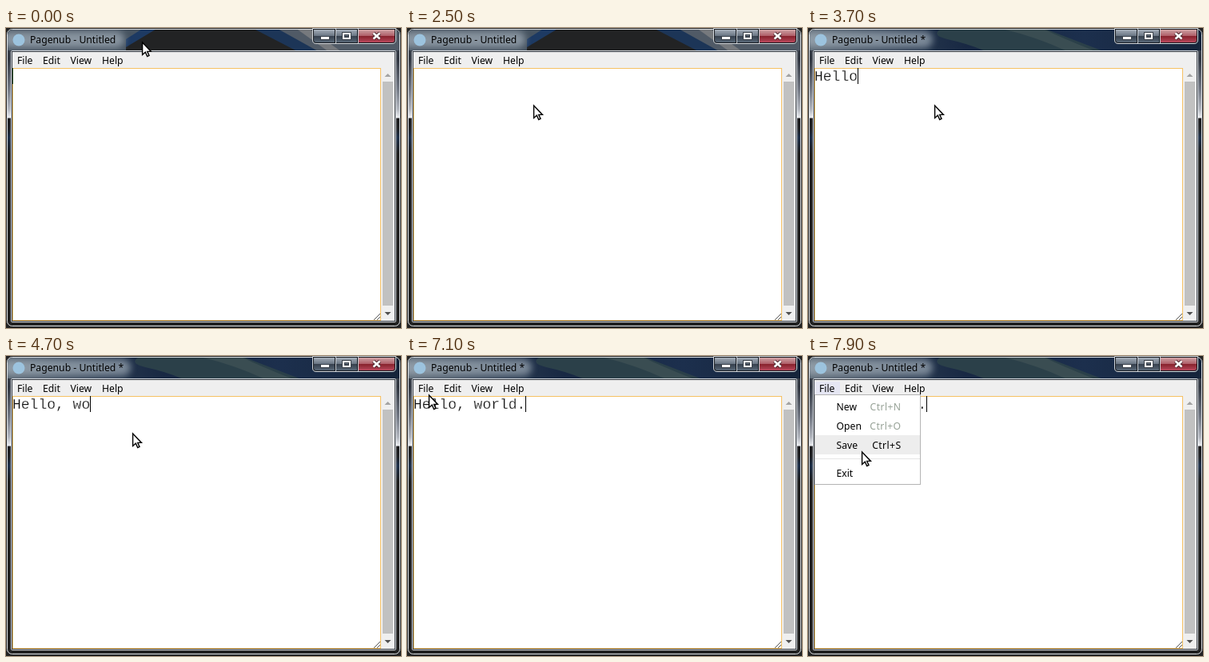
Animation of 494x375 px, one loop 8 s. Source, as an HTML page:

```html
<!DOCTYPE html>
<html lang="en">
<head>
<meta charset="utf-8">
<title>Text editor</title>
<style>
  html, body { margin: 0; width: 100%; height: 100%; overflow: hidden; background: #222; }
  svg { display: block; }
  text { font: 12.2px "Noto Sans", "Open Sans", sans-serif; fill: #000; white-space: pre; }
  #typed { font: 18px "Liberation Mono", monospace; fill: #111; stroke: #fff; stroke-width: .3; }
  .key { fill: #97a297; letter-spacing: .4px; text-anchor: end; }
  .hot { fill: #000; }
</style>
</head>
<body>
<svg width="494" height="375" viewBox="0 0 494 375">
  <defs>
    <linearGradient id="side" x2="0" y2="1">
      <stop offset="0" stop-color="#4a525c"/>
      <stop offset=".1" stop-color="#343a44"/>
      <stop offset=".2" stop-color="#747a86"/>
      <stop offset=".27" stop-color="#b4b8c0"/>
      <stop offset=".297" stop-color="#eceef2"/>
      <stop offset=".302" stop-color="#1e1e20"/>
      <stop offset=".335" stop-color="#242629"/>
      <stop offset=".365" stop-color="#22344e"/>
      <stop offset=".42" stop-color="#222"/>
      <stop offset="1" stop-color="#222"/>
    </linearGradient>
    <linearGradient id="grey" x2="0" y2="1">
      <stop offset="0" stop-color="#a5aeb9"/>
      <stop offset=".47" stop-color="#6b7785"/>
      <stop offset=".5" stop-color="#343e4b"/>
      <stop offset="1" stop-color="#596878"/>
    </linearGradient>
    <linearGradient id="red" x2="0" y2="1">
      <stop offset="0" stop-color="#cfa3a5"/>
      <stop offset=".47" stop-color="#b0606a"/>
      <stop offset=".5" stop-color="#85202a"/>
      <stop offset="1" stop-color="#b8485c"/>
    </linearGradient>
    <linearGradient id="navy">
      <stop offset="0" stop-color="#596672"/>
      <stop offset=".3" stop-color="#22334a"/>
      <stop offset=".4" stop-color="#182843"/>
      <stop offset=".7" stop-color="#1c2f4d"/>
      <stop offset="1" stop-color="#15243a"/>
    </linearGradient>
    <filter id="blur" x="-20%" y="-80%" width="140%" height="260%"><feGaussianBlur stdDeviation="4"/></filter>
    <clipPath id="bar"><path d="M2 28V8Q2 2 8 2H486Q492 2 492 8V28Z"/></clipPath>
  </defs>

  <!-- glass frame -->
  <rect x="1.5" y="1.5" width="491" height="371" rx="6" fill="url(#side)" stroke="#e2e6ea"/>
  <g clip-path="url(#bar)">
    <g id="clean">
      <rect width="494" height="30" fill="#222324"/>
      <path d="M0 0H188L150 22V30H0Z" fill="#465360"/>
      <path d="M172 0H190L150 24V14Z" fill="#1d3a63"/>
      <path d="M308 0H345L392 30H366Z" fill="#1c3557"/>
      <path d="M338 0H494V30H392Z" fill="#505a66"/>
      <path d="M362 0H378L420 30H404Z" fill="#76797d"/>
    </g>
    <g id="dirty">
      <rect width="494" height="30" fill="url(#navy)"/>
      <path d="M168 0Q152 9 174 14Q202 20 224 30H372Q330 14 294 0Z" fill="#2b4049"/>
      <path d="M238 0H292Q318 13 362 30H326Q284 10 238 0Z" fill="#3a4d52"/>
    </g>
    <rect id="glow" x="-6" y="4" height="21" rx="10" fill="#b0bcc6" opacity=".62" filter="url(#blur)"/>
  </g>
  <circle cx="16" cy="15" r="7.5" fill="#9cc3de"/>
  <text id="title" x="30" y="19"></text>

  <!-- window buttons -->
  <path d="M383.5 .5H487.5V15Q487.5 19.5 483 19.5H388Q383.5 19.5 383.5 15Z" fill="#15191f" stroke="#d3d8dd"/>
  <path d="M385 2H411V18H388Q385 18 385 15Z" fill="url(#grey)"/>
  <rect x="413" y="2" width="26" height="16" fill="url(#grey)"/>
  <path d="M441 2H486V15Q486 18 483 18H441Z" fill="url(#red)"/>
  <path d="M412.5 1V19M440.5 1V19" stroke="#c3c9d0"/>
  <rect x="393.5" y="10.5" width="11" height="4" fill="#fff" stroke="#3c434c"/>
  <g fill="none">
    <rect x="422" y="7" width="8" height="6" stroke="#3c434c" stroke-width="4"/>
    <rect x="422" y="7" width="8" height="6" stroke="#fff" stroke-width="2"/>
    <path d="M459.500 6.500L467.500 13.500M467.500 6.500L459.500 13.500" stroke="#4d2a30" stroke-width="4.500"/>
    <path d="M459.500 6.500L467.500 13.500M467.500 6.500L459.500 13.500" stroke="#fff" stroke-width="2.500"/>
  </g>

  <!-- client area -->
  <rect x="6.5" y="28.5" width="481" height="339" rx="1" fill="none" stroke="#d9dde2"/>
  <rect x="7.5" y="29.5" width="479" height="337" fill="#efefef" stroke="#33383f"/>
  <rect id="lit" x="8" y="32" width="32" height="16" fill="#e5e6f3"/>
  <text x="14" y="45">File</text>
  <text x="46" y="45">Edit</text>
  <text x="80.5" y="45">View</text>
  <text x="120" y="45">Help</text>
  <rect x="8.5" y="50.5" width="460" height="315" fill="#fff" stroke="#f6c163"/>
  <path d="M460 365L468 357M464 365L468 361" stroke="#555"/>
  <rect x="471" y="67" width="13" height="280" fill="#c1c1c1"/>
  <path d="M473.5 61L477.5 57L481.5 61Z" fill="#a3a3a3"/>
  <path d="M473.5 355L477.5 359L481.5 355Z" fill="#505050"/>
  <text id="typed" x="8" y="66"></text>
  <rect id="caret" y="50" width="1" height="20"/>

  <g id="menu">
    <rect x="8.5" y="48.5" width="132" height="112" fill="#fff" stroke="#b4b4b4"/>
    <rect id="hover" x="9" width="131" height="24" fill="#ededed"/>
    <path d="M9 128.5H140" stroke="#e6e6e6"/>
    <g id="items"></g>
  </g>
  <path id="mouse" d="M.6 1V16.500L4.300 13.200L6.700 18.500L9 17.500L6.700 12.400H11.400Z" fill="#fff" stroke="#000" stroke-width="1.400"/>
</svg>
<script>
const LOOP = 8000, CHAR = 10.8;
const PHRASE = "Hello, world.";
const TYPED = [2900, 3100, 3300, 3500, 3700, 3900, 4300, 4500, 4700, 5300, 5500, 5700, 5900];
const BLINK = [400, 900, 1400, 1900, 2500, 2900, 6500, 7100, 7500, 7700];
const ITEMS = [["New", 51, "Ctrl+N"], ["Open", 75, "Ctrl+O"], ["Save", 99, "Ctrl+S"], ["Exit", 134, ""]];
// time, x, y
const MOUSE = [
  [0, 170, 17], [400, 168, 36], [500, 162, 74], [600, 158, 96],
  [6500, 141, 90], [6700, 78, 62], [6900, 34, 49], [7100, 27, 48],
  [7300, 24, 42], [7700, 62, 104], [7800, 94, 137], [7900, 67, 119]
];

const $ = id => document.getElementById(id);
const show = (id, on) => $(id).setAttribute("visibility", on ? "visible" : "hidden");
const passed = (list, t) => list.filter(s => s <= t).length;

function label(str, x, y, cls) {
  const el = document.createElementNS("http://www.w3.org/2000/svg", "text");
  el.setAttribute("x", x);
  el.setAttribute("y", y);
  el.setAttribute("class", cls);
  el.textContent = str;
  $("items").append(el);
  return el;
}

const keys = ITEMS.map(([name, top, key]) => {
  label(name, 35.5, top + 17, "");
  return label(key, 116.5, top + 17, "key");
});

function draw(t) {
  const count = passed(TYPED, t), dirty = count > 0;
  const [, x, y] = MOUSE.findLast(m => m[0] <= t);
  const open = t >= 7500;
  const row = open ? ITEMS.findIndex(([, top]) => y >= top && y < top + 24) : -1;

  $("title").textContent = "Pagenub - Untitled" + (dirty ? " *" : "");
  $("glow").setAttribute("width", dirty ? 162 : 154);
  show("clean", !dirty);
  show("dirty", dirty);

  $("typed").textContent = PHRASE.slice(0, count);
  $("caret").setAttribute("x", Math.round(8 + count * CHAR));
  $("caret").setAttribute("fill", count ? "#000" : "#24481c");
  show("caret", passed(BLINK, t) % 2 === 0);

  show("lit", t >= 7300);
  show("menu", open);
  show("hover", row >= 0);
  if (row >= 0) $("hover").setAttribute("y", ITEMS[row][1]);
  keys.forEach((k, i) => k.classList.toggle("hot", i === row));
  $("mouse").setAttribute("transform", `translate(${x} ${y})`);
}

const start = performance.now();
function tick() {
  draw((performance.now() - start) % LOOP);
  requestAnimationFrame(tick);
}
draw(0);
tick();
</script>
</body>
</html>
```
